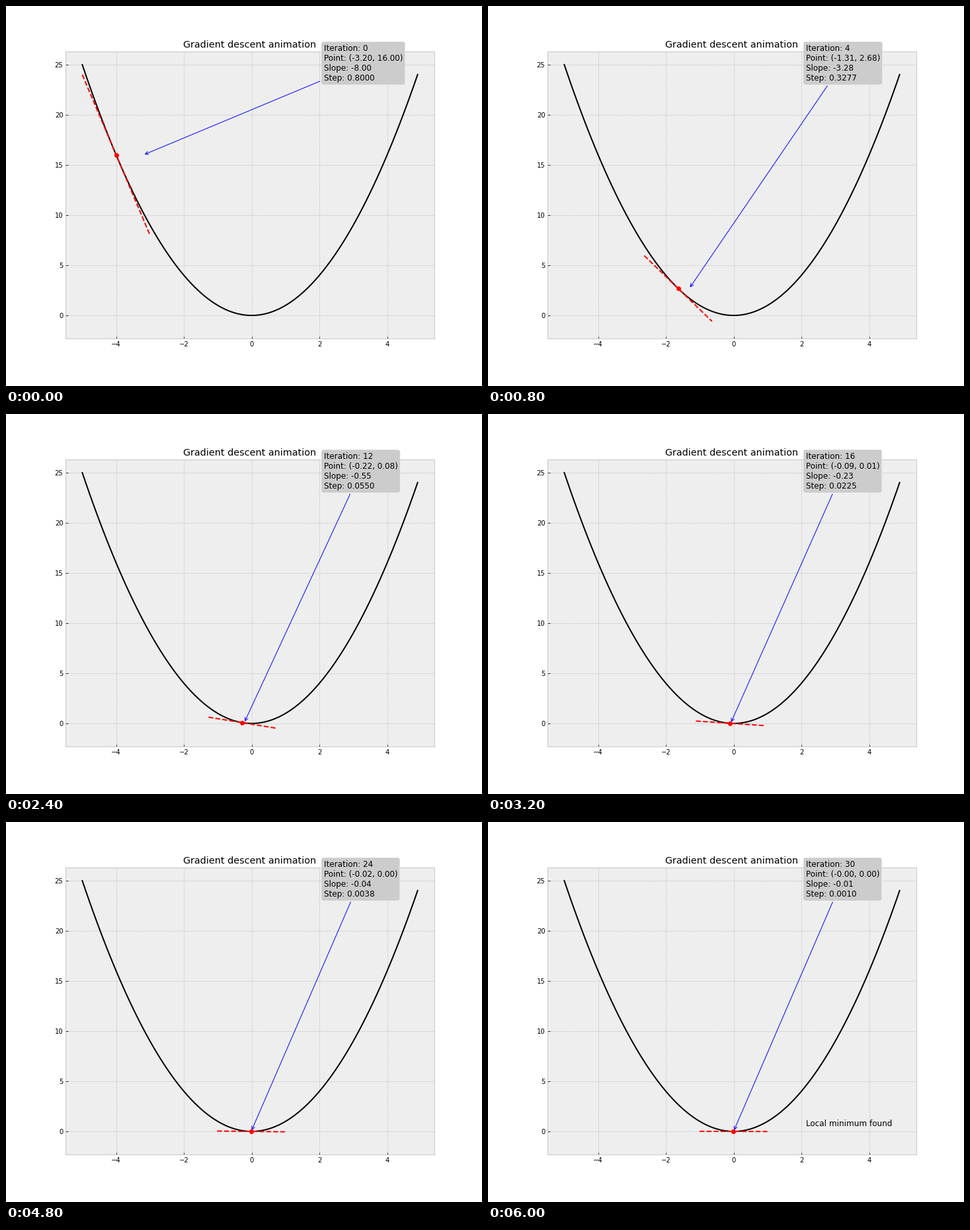
Write a matplotlib script that moves like this. It is 720 px wide and 576 px high and loops after 8 s.

```python
import numpy as np
import matplotlib.pyplot as plt
from matplotlib.animation import FuncAnimation

plt.rcParams.update({
    "font.family": "DejaVu Sans",
    "font.size": 10,
    "lines.linewidth": 2,
    "axes.facecolor": "#eeeeee",
    "axes.edgecolor": "#bcbcbc",
    "axes.grid": True,
    "axes.axisbelow": "line",
    "axes.titlesize": "x-large",
    "grid.color": "#b2b2b2",
    "grid.linestyle": "--",
    "grid.linewidth": 0.5,
    "xtick.direction": "in",
    "ytick.direction": "in",
    "patch.linewidth": 0.5,
    "patch.edgecolor": "#eeeeee",
})

START, RATE = -4, 0.1
LAST_STEP = 30
FRAMES, INTERVAL = 40, 200


def f(x):
    return x ** 2


def slope(x):
    return 2 * x


fig, ax = plt.subplots(figsize=(10, 8), dpi=72, facecolor="white")
fig.subplots_adjust(left=0.125, right=0.9, bottom=0.125, top=0.88)
ax.set_title("Gradient descent animation")

xs = np.arange(-5, 5, 0.1)
ax.plot(xs, f(xs), "k")
tangent, = ax.plot([], [], "r--")
dot, = ax.plot([], [], "ro", markersize=6)
ax.set(xlim=(-5.495, 5.395), ylim=(-2.3, 26.3))

info = ax.annotate(
    "", xy=(0, 0), xytext=(0.7, 0.893), textcoords="axes fraction",
    size=12, va="bottom",
    bbox=dict(boxstyle="round", fc="0.8"),
    arrowprops=dict(arrowstyle="->", color="blue", lw=1),
)
found = ax.text(0.7, 0.1, "Local minimum found", size=12,
                transform=ax.transAxes)


def draw(frame):
    i = min(frame, LAST_STEP)
    x = START * (1 - 2 * RATE) ** i
    y, m = f(x), slope(x)
    step = -RATE * m

    ends = np.array([x - 1, x + 1])
    tangent.set_data(ends, y + m * (ends - x))
    dot.set_data([x], [y])
    info.xy = (x + step, y)
    info.set_text(f"Iteration: {i}\n"
                  f"Point: ({x + step:.2f}, {y:.2f})\n"
                  f"Slope: {m:.2f}\n"
                  f"Step: {step:.4f}")
    found.set_visible(i == LAST_STEP)
    return tangent, dot, info, found


anim = FuncAnimation(fig, draw, frames=FRAMES, interval=INTERVAL,
                     init_func=lambda: draw(0), repeat=True, repeat_delay=0)
plt.show()
```
